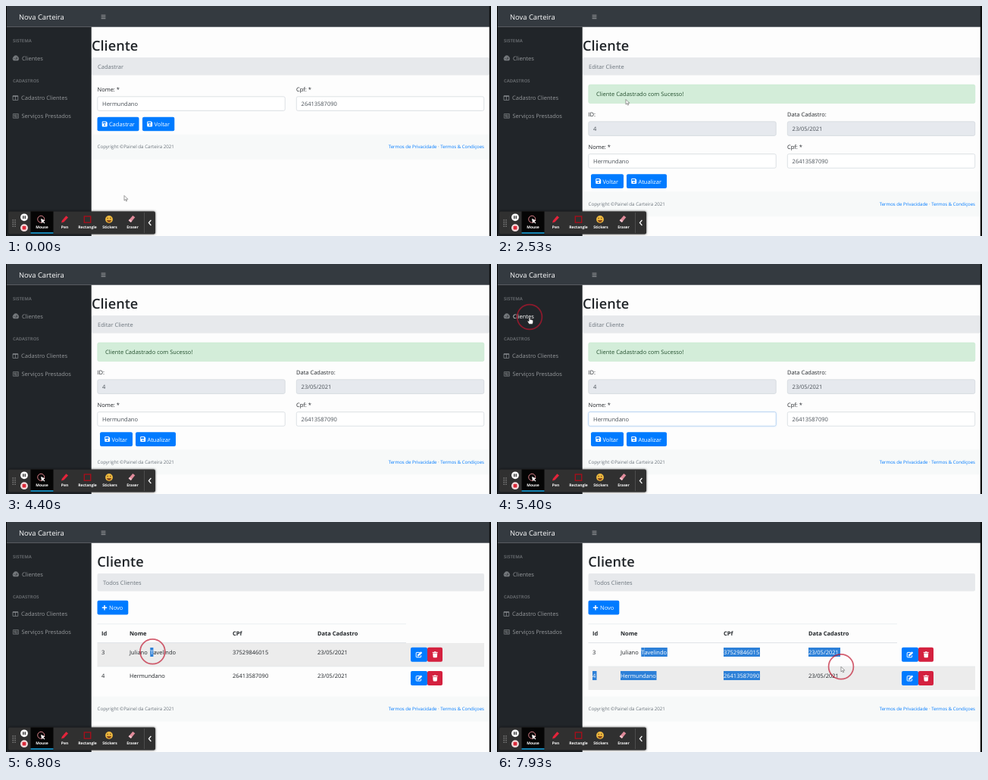
Write an HTML page that moves like this. It is 640 by 304 pixels and loops after 8000 ms.

```html
<!DOCTYPE html>
<html lang="pt">
<head>
<meta charset="utf-8">
<title>Clientes</title>
<style>
  html, body { margin: 0; width: 100%; height: 100%; overflow: hidden; background: #fdfdfd; }
  svg { display: block; width: 640px; height: 304px; }
  text { font-family: "Open Sans", "Noto Sans", sans-serif; font-size: 7.5px; text-rendering: geometricPrecision; white-space: pre; }
  .tool { font-weight: 700; font-size: 5px; text-anchor: middle; }
  .small { font-size: 6.2px; }
  .links { font-size: 6.05px; text-anchor: end; }
</style>
</head>
<body>
<svg id="stage" viewBox="0 0 640 304"></svg>
<script>
const LOOP = 8000;
const BLUE = '#007bff', INK = '#212529', FIELD = '#495057', MUTED = '#6c757d', PICK = '#2d80d8';
const NAME = 'Hermundano', CPF = '26413587090', CPF2 = '37529846015', DAY = '23/05/2021';

const rect = (x, y, w, h, fill, more = '') =>
  `<rect x="${x}" y="${y}" width="${w}" height="${h}" fill="${fill}" ${more}/>`;
const text = (x, y, s, fill = INK, more = '') => `<text x="${x}" y="${y}" fill="${fill}" ${more}>${s}</text>`;
const path = (d, fill, more = '') => `<path d="${d}" fill="${fill}" ${more}/>`;
const line = (d, stroke, width = 1, more = '') =>
  path(d, 'none', `stroke="${stroke}" stroke-width="${width}" ${more}`);
const at = (x, y, s) => `<g transform="translate(${x} ${y})">${s}</g>`;
const group = (id, s) => `<g id="${id}">${s}</g>`;
const circle = (x, y, r, fill, more = '') => `<circle cx="${x}" cy="${y}" r="${r}" fill="${fill}" ${more}/>`;

const floppy = path('M0 1Q0 0 1 0H5.4L7 1.6V6Q7 7 6 7H1Q0 7 0 6ZM1 1V2.8H5V1ZM3.5 3.8A1 1 0 1 0 3.5 5.8A1 1 0 1 0 3.5 3.8Z',
  '#fff', 'fill-rule="evenodd"');
const pencil = line('M5.2 1.2H1.1Q.5 1.2 .5 1.8V7Q.5 7.6 1.1 7.6H6.3Q6.9 7.6 6.9 7V5', '#fff', 1) +
  path('M2.5 4.4L6.8 .1L8.5 1.8L4.2 6.1L2.2 6.4Z', '#fff');
const trash = rect(0, .7, 7, 1, '#fff') + rect(2.3, 0, 2.4, 1, '#fff') +
  path('M.5 2.3H6.5L6.1 7.2Q6 8 5.3 8H1.7Q1 8 .9 7.2Z', '#fff');

const button = (x, y, w, label, id = '') =>
  rect(x, y, w, 18.6, BLUE, `rx="2" ${id && `id="${id}"`}`) +
  at(x + 6.2, y + 5.8, floppy) + text(x + 15.4, y + 12.2, label, '#fff');

const field = (x, y, label, value, locked, id = '') =>
  text(x, y - 6.8, label) +
  rect(x + .3, y + .3, 247.4, 18.6, locked ? '#e6e9ee' : '#fff', `rx="2" stroke="#ced4da" stroke-width=".7" ${id && `id="${id}"`}`) +
  text(x + 6.6, y + 12.6, value, FIELD);

const footer = y => rect(113, y, 525, 33, '#f7f9f9') +
  text(120.5, y + 18.7, 'Copyright ©Painel da Carteira 2021', MUTED, 'class="small"') +
  text(631, y + 18.7, `Termos de Privacidade <tspan fill="${MUTED}">·</tspan> Termos &amp; Condiçoes`, BLUE, 'class="links"');

const heading = (x, crumb, wide) =>
  text(x, 58.9, 'Cliente', INK, 'font-weight="600" style="font-size:18.2px"') +
  rect(wide ? 113 : 120.5, 68, wide ? 525 : 510.5, 23.6, '#e7e9ec', 'rx="2"') +
  text(wide ? 121 : 128, 83, crumb, MUTED);

const formPage = heading(113, 'Cadastrar', true) +
  field(120.5, 119.5, 'Nome: *', NAME) + field(383, 119.5, 'Cpf: *', CPF) +
  button(120.5, 146.7, 55, 'Cadastrar', 'save') + button(180, 146.7, 42.3, 'Voltar') + footer(169.7);

const editPage = heading(113, 'Editar Cliente', true) +
  rect(120.8, 104, 510, 24.6, '#d3edd9', 'rx="2" stroke="#c3e6cb" stroke-width=".6"') +
  text(131, 119, 'Cliente Cadastrado com Sucesso!', '#24502f') +
  field(120.5, 152.5, 'ID:', '4', true) + field(383, 152.5, 'Data Cadastro:', DAY, true) +
  field(120.5, 195.3, 'Nome: *', NAME, false, 'nameBox') + field(383, 195.3, 'Cpf: *', CPF) +
  button(124, 222.3, 43, 'Voltar') + button(171, 222.3, 53, 'Atualizar') + footer(245.3);

// Selectable table texts: [selection time, x, baseline, width, label]
const cells = [
  [6700, 190.3, 175, 4.1, 'T'], [6920, 194.4, 175, 30.4, 'avelindo'],
  [7130, 299, 175, 48, CPF2], [7330, 411, 175, 42, DAY],
  [7500, 126, 206, 5.5, '4'], [7500, 163, 206, 47.5, NAME], [7560, 299, 206, 48, CPF]
];
const cell = ([, x, y, w, s], i) =>
  group('cell' + i, rect(x, y - 9, w, 12, PICK) + text(x, y, s));
const actions = y => rect(534, y, 22, 19, BLUE, 'rx="2"') + at(540.7, y + 5.4, pencil) +
  rect(556, y, 20, 19, '#d4213f', 'rx="2"') + at(562.7, y + 5.4, trash);

const listPage = heading(120.3, 'Todos Clientes', false) +
  rect(120.5, 103.7, 40.8, 18.8, BLUE, 'rx="2"') + line('M130 110V116.4M126.8 113.2H133.2', '#fff', 1.5) +
  text(136, 116, 'Novo', '#fff') +
  rect(120.5, 160, 510.5, 31, '#ececec', 'id="row0"') + rect(120.5, 191, 510.5, 31, '#ececec', 'id="row1"') +
  line('M120.5 134.8H528', '#dee2e6', .6) + line('M120.5 159.7H528', '#dee2e6', 1) + line('M120.5 191H631', '#dee2e6', .6) +
  [[126, 'Id'], [163, 'Nome'], [299, 'CPf'], [411, 'Data Cadastro']].map(([x, s]) => text(x, 150, s, INK, 'font-weight="700"')).join('') +
  text(126, 175, '3') + text(163, 175, 'Juliano') + cells.map(cell).join('') +
  text(411, 206, DAY) + actions(165.8) + actions(197) + footer(230.6);

const gray = '#84888c';
const sidebar = rect(0, 0, 640, 27.7, '#343a40') + rect(0, 27.7, 112.7, 277, '#212529') +
  text(17, 18, 'Nova Carteira', '#fff', 'style="font-size:9.4px"') +
  line('M125.6 12.2H131.4M125.6 14.4H131.4M125.6 16.6H131.4', '#a5a8ab', .9) +
  [[48.3, 'SISTEMA'], [101.2, 'CADASTROS']].map(([y, s]) => text(9, y, s, '#62666a', 'font-weight="700" style="font-size:5.9px"')).join('') +
  path('M10 72.3A4 4 0 1 1 15.8 72.3Z', '#74787c') + line('M12.9 71L14.3 67.6M10.4 69.5H11.3M14.8 69.5H15.6', '#212529', .8) +
  text(21, 72, 'Clientes', '#95989b', 'id="menu"') +
  line('M9 118.8H15.8V124.4H9ZM12.4 118.8V124.4', gray, .8) + line('M9 119.2H15.8', gray, 1.2) +
  text(20, 124.3, 'Cadastro Clientes', '#95989b') +
  line('M9.4 142.6H16.4V148.2H9.4ZM11 144H13V145.6H11ZM14 144H15.4M14 145.4H15.4M11 146.9H15.4', gray, .7) +
  text(20.5, 148.3, 'Serviços Prestados', '#95989b');

const dots = [8.6, 11.4].flatMap(x => [283, 285.7, 288.4, 291.1].map(y => rect(x, y - .6, 1.2, 1.2, '#aaa'))).join('');
const labels = [[47.5, 'Mouse'], [77.5, 'Pen'], [107.5, 'Rectangle'], [137, 'Stickers'], [167, 'Eraser']];
const toolbar = rect(3, 271.5, 194, 30, '#303030', 'rx="2" style="filter:drop-shadow(0 0 1.5px rgba(0,0,0,.7))"') + dots +
  circle(24, 279.3, 4.9, '#fff') + rect(22.1, 277.3, 1.3, 4, '#222') + rect(24.6, 277.3, 1.3, 4, '#222') +
  circle(24, 293.2, 4.9, '#f3dcde') + rect(21.6, 290.8, 4.8, 4.8, '#dc2a3a', 'rx=".8"') +
  rect(32.5, 271.5, 30, 30, '#050505') + rect(32.5, 299.2, 30, 1.6, '#1ba3dc') +
  circle(46.2, 281.8, 4.5, 'none', 'stroke="#d98088" stroke-width="1"') + path('M46 281L51.6 283.4L49.2 284.4L51.4 286.8L50.4 287.6L48.3 285.3L47.2 287.4Z', '#fff') +
  path('M73 286.5L74 283.4L79.4 277.2L82 279.5L76.4 285.4Z', '#e3243b') +
  rect(103.3, 278, 8.4, 8.2, 'none', 'stroke="#a3101c" stroke-width="1.4"') +
  circle(136, 282, 4.9, '#eeb93f') + path('M133 283H139Q138.4 286 136 286Q133.6 286 133 283Z', '#8b4a1c') + rect(133.6, 279.8, 1.1, 1.5, '#5b3a17') + rect(137.2, 279.8, 1.1, 1.5, '#5b3a17') +
  path('M161.7 283.6L167.3 277L170.3 279.3L164.8 286.1Z', '#e08a9a') + path('M161.7 283.6L163.2 281.8L166.3 284.2L164.8 286.1Z', '#f0c3cc') +
  labels.map(([x, s]) => text(x, 294.2, s, '#fff', 'class="tool"')).join('') +
  rect(182, 273, .7, 27, '#5a5a5a') + line('M191.4 283L188.4 286.5L191.4 290', '#fff', 1.2);

const arrow = path('M0 0V6.6L1.6 5.2L2.6 7.6L3.7 7.1L2.7 4.8H4.8Z', '#fff', 'stroke="#4b4b4b" stroke-width=".55"');
const hand = path('M-.9 .8Q0 -.6 .8 .8V3.5Q1.6 2.9 2.1 3.7Q3 3.2 3.4 4.1Q4.6 3.9 4.6 5.2V7.2L3.8 9.4H-.6L-2.8 6Q-3 4.7 -1.7 5.2L-.9 6Z', '#fff', 'stroke="#222" stroke-width=".55"');

const $ = id => document.getElementById(id);
$('stage').innerHTML = rect(0, 0, 640, 304, '#fdfdfd') + sidebar +
  group('page0', formPage) + group('page1', editPage) + group('page2', listPage) +
  rect(0, 0, 1, 304, '#050606') + rect(637.8, 0, 2.2, 304, '#0c0d0e') + toolbar +
  circle(0, 0, 16.4, 'none', 'id="ring" stroke="#c0152f" stroke-opacity=".68" stroke-width="1.7"') +
  group('arrow', arrow) + group('hand', hand);

// Pointer path: [time, x, y]
const track = [
  [0, 156, 250.5], [300, 156, 250.5], [1080, 146.5, 151], [1200, 146.5, 150], [2060, 146.5, 150],
  [2400, 170, 123.5], [2860, 170, 123.5], [3600, 180, 204], [4780, 180, 204], [5260, 43, 70],
  [5900, 43, 70], [6500, 193.4, 171.2], [6820, 193.4, 171.2], [6980, 225, 172], [7150, 345, 175],
  [7350, 440, 181], [7520, 454, 191.3], [LOOP, 454, 191.3]
];
const clicks = [[1440, 1620], [4600, 4720], [5340, 5560], [6620, LOOP]];
const within = (t, a, b) => t >= a && t < b;
const show = (id, on) => { $(id).style.display = on ? '' : 'none'; };

function pointer(t) {
  const i = track.findIndex(k => k[0] > t);
  const [t0, x0, y0] = track[i - 1], [t1, x1, y1] = track[i];
  const p = (t - t0) / (t1 - t0), e = p * p * (3 - 2 * p);
  return [x0 + (x1 - x0) * e, y0 + (y1 - y0) * e];
}

function draw(t) {
  const [x, y] = pointer(t);
  const page = t < 1860 ? 0 : t < 5600 ? 1 : 2;
  for (let i = 0; i < 3; i++) show('page' + i, i === page);

  const onSave = page === 0 && within(y, 146, 165);
  const onMenu = within(x, 0, 70) && within(y, 60, 80);
  $('save').setAttribute('fill', onSave ? '#0062cc' : BLUE);
  $('menu').setAttribute('fill', onMenu ? '#fff' : '#95989b');

  const focus = within(t, 4600, 5480) ? Math.min(1, (t - 4600) / 150, (5480 - t) / 150) : 0;
  const mix = (a, b) => Math.round(a + (b - a) * focus);
  $('nameBox').setAttribute('stroke', `rgb(${mix(206, 128)},${mix(212, 189)},${mix(218, 255)})`);
  $('nameBox').style.filter = focus ? `drop-shadow(0 0 1px rgba(0,123,255,${.35 * focus}))` : '';

  show('row0', x > 120 && within(y, 160, 191));
  show('row1', x > 120 && within(y, 191, 222));
  cells.forEach(([start], i) => {
    const [box, label] = $('cell' + i).children;
    box.style.display = t >= start ? '' : 'none';
    label.setAttribute('fill', t >= start ? '#fff' : INK);
  });

  const overText = within(t, 3450, 4850) || within(t, 6400, 7400);
  const over = onSave || onMenu;
  show('hand', over);
  show('arrow', !over && !overText);
  show('ring', clicks.some(([a, b]) => within(t, a, b)));
  for (const id of ['hand', 'arrow', 'ring']) $(id).setAttribute('transform', `translate(${x} ${y})`);
}

const begin = performance.now();
function tick() {
  draw((performance.now() - begin) % LOOP);
  requestAnimationFrame(tick);
}
tick();
</script>
</body>
</html>
```
